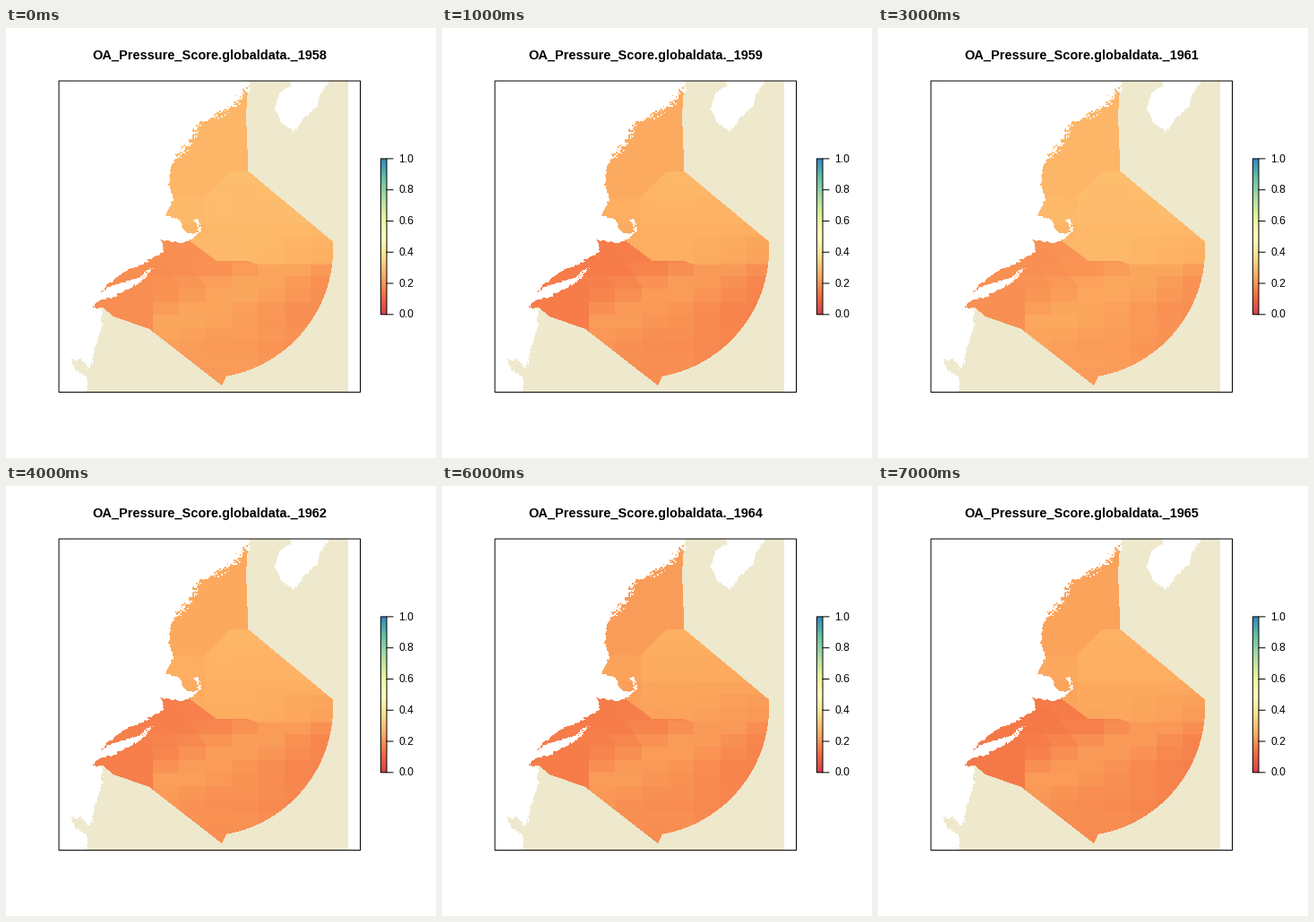
A matplotlib script that plays this animation: 480x480 px, repeating every 8 s.

```python
import numpy as np
import matplotlib.pyplot as plt
from matplotlib.animation import FuncAnimation
from matplotlib.colors import LinearSegmentedColormap, to_rgb
from matplotlib.patches import Rectangle
from matplotlib.path import Path

SIZE = 480
PT = 0.72  # points per pixel at 100 dpi
CELL_W, CELL_H = 29.3, 14.6
FIRST_YEAR = 1958

# Yearly score level of the northern and southern waters
NORTH = [.271, .244, .258, .270, .242, .209, .218, .228]
SOUTH = [.190, .155, .176, .195, .161, .155, .155, .150]

# Key points; the ragged detail comes from seeded noise
MAINLAND = [
    (50, 50), (271, 50), (271, 66), (255, 86), (238, 96), (218, 106),
    (203, 130), (184, 152), (182, 178), (187, 192), (178, 209), (192, 213),
    (202, 229), (215, 229), (214, 219), (207, 213), (215, 214), (218, 227),
    (210, 234), (196, 240), (174, 236), (176, 250), (150, 265), (134, 271),
    (110, 289), (103, 305), (97, 312), (108, 314), (107, 335), (98, 361),
    (95, 378), (90, 380), (88, 372), (73, 370), (78, 382), (91, 390),
    (90, 410), (50, 410)]
LONG_ISLE = [(102, 304), (110, 291), (150, 278), (165, 267),
             (150, 284), (120, 300)]
EAST_LAND = [(313, 50), (318, 64), (306, 71), (300, 90), (308, 107),
             (322, 116), (331, 103), (347, 87), (353, 70), (368, 50)]

plt.rcParams["font.family"] = "Liberation Sans"
spectral = LinearSegmentedColormap.from_list("scores", [
    "#D53E4F", "#F46D43", "#FDAE61", "#FEE08B", "#FFFFBF",
    "#E6F598", "#ABDDA4", "#66C2A5", "#3288BD"], N=512)

gy, gx = np.mgrid[0:SIZE, 0:SIZE] + 0.5
rng = np.random.default_rng(8)


def block_noise(step):
    n = SIZE // step
    return np.kron(rng.normal(size=(n, n, 2)), np.ones((step, step, 1)))


wobble = 0.7 * block_noise(2) + 0.7 * block_noise(4)


def inside(points, rough=0.0):
    amount = np.broadcast_to(rough, gx.shape)[..., None]
    pts = np.dstack([gx, gy]) + wobble * amount
    return Path(points).contains_points(pts.reshape(-1, 2)).reshape(gx.shape)


def cell_centre(x, start, size):
    return start + size * (np.floor((x - start) / size) + 0.5)


def ramp(x, start, end):
    return np.clip((x - start) / (end - start), 0, 1)


# The study area closes with a circular arc in the southeast
angle = np.radians(np.linspace(-3, 80, 40))
arc = list(zip(220.7 + 144.5 * np.cos(angle), 246 + 145 * np.sin(angle)))
study_area = [(200, 50), (270.5, 60), (268, 98), (270.5, 160), *arc,
              (241, 399), (160, 336), (120, 322), (108, 312), (97, 313),
              (97, 150)]

land = inside(MAINLAND, np.where(gy < 145, 2.8, 0.7))
land |= inside(LONG_ISLE, 0.7) | inside(EAST_LAND, 0.7)
water = (gx > 59) & (gx < 382) & (gy > 59) & (gy < 406.5) & ~land
study = inside(study_area) & water
base = np.ones((SIZE, SIZE, 3))
base[water] = to_rgb("#EEE8CD")

# Blocky weights that split the sea into shaded cells
slant = np.where(gx < 235, 0.7 * np.clip(288 - gy, 0, None), 0)
cx = cell_centre(gx + slant, 252, CELL_W)
cy = cell_centre(gy, 189, CELL_H)
is_north = gy < np.interp(gx, [204, 235, 270, 281], [237, 260, 260, 264])

band = 1 - 0.8 * ramp(cy, 180, 255)
band[(gy < 159.8) | ((gx + gy < 411) & (gy < 189))] = 0
band[(gx < 222) & (gy > 189)] *= 0.4
fade = 0.6 * ramp(cx, 280, 390) * ramp(cy, 215, 275)

dist = cy - (335 - 0.5 * (cx - 175))
bump = np.exp(-(dist / 30) ** 2)
ridge = np.where(dist > 0, 0.55 + 0.45 * bump, bump) * (cx > 160)
edge = ramp(cx, 270, 340) * ramp(dist, 10, 50)
ripple = 0.003 * np.sin(1.7 * cx + 2.3 * cy) * (np.where(is_north, band, ridge) > 0)


def draw_map(i):
    coast, west = NORTH[i], SOUTH[i]
    high = 0.1 + 0.7 * coast
    mid = 0.14 + 0.5 * west
    east = 0.07 + 0.63 * west
    north = coast + (high - coast) * band
    north += (east - north) * fade
    south = west + (mid - west) * ridge
    south += (east - south) * edge
    score = np.where(is_north, north, south) + ripple
    img = base.copy()
    img[study] = spectral(score[study])[:, :3]
    return img


fig = plt.figure(figsize=(4.8, 4.8), dpi=100, facecolor="white")
ax = fig.add_axes([0, 0, 1, 1])
ax.axis("off")
picture = ax.imshow(draw_map(0), extent=(0, SIZE, SIZE, 0), interpolation="nearest")
ax.imshow(np.linspace(1, 0, 256)[:, None], cmap=spectral, vmin=0, vmax=1,
          extent=(418, 425, 320, 146), aspect="auto")


def outline(x0, y0, x1, y1):
    ax.add_patch(Rectangle((x0, y0), x1 - x0, y1 - y0, fill=False,
                           ec="black", lw=PT, snap=False))


outline(59.04, 59.04, 395.5, 406.56)
outline(418.3, 145.9, 425, 319.8)
for k in range(6):
    y = 319.8 - 34.78 * k
    ax.plot([425, 432], [y, y], color="black", lw=PT, snap=False)
    ax.text(438.6, y + 3.6, f"{k / 5:.1f}", size=12 * PT, va="baseline")
title = ax.text(227.5, 35, "", size=14.5 * PT, weight="bold",
                ha="center", va="baseline")
ax.set_xlim(0, SIZE)
ax.set_ylim(SIZE, 0)
ax.set_aspect("auto")


def update(i):
    picture.set_data(draw_map(i))
    title.set_text(f"OA_Pressure_Score.globaldata._{FIRST_YEAR + i}")
    return picture, title


anim = FuncAnimation(fig, update, frames=len(NORTH), interval=1000,
                     repeat=True, repeat_delay=0)
plt.show()
```
